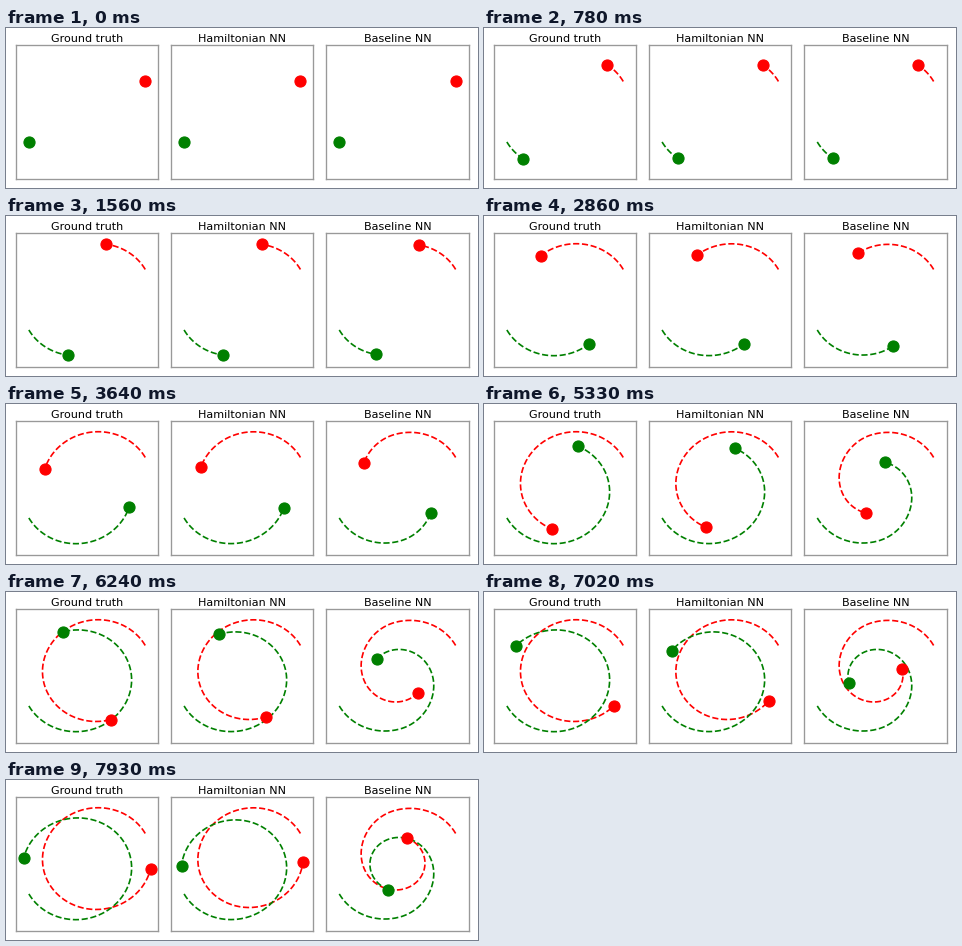
Animation of 472x160 px, one loop 8000 ms. Source, as a matplotlib script:

```python
import matplotlib.pyplot as plt
import numpy as np
from matplotlib.animation import FuncAnimation

W, H, DPI = 472, 160, 80
STEP, LOOP, TICK = 130, 8000, 20   # ms
LAST = LOOP // STEP                # index of the final pose
SUB = 4                            # trail samples per step

# Panel layout in pixels; data units are pixels on the vertical axis
LEFT, PITCH, WIDTH = 9.9, 155.2, 142.3
BOTTOM, HEIGHT = 9.3, 134
LIM = HEIGHT / 2

# True orbit: size, eccentricity, periapsis angle, starting phase, mean motion
SEMI, ECC = 51.77, 0.209
PERI, PHASE, RATE = np.radians([208.1, -178.8, 5.09])


def ease(u, start, end):
    """Smoothstep from 0 at start to 1 at end."""
    v = np.clip((u - start) / (end - start), 0, 1)
    return v * v * (3 - 2 * v)


def kepler(t):
    """Radius and unwrapped angle on the true orbit at step t."""
    mean = PHASE + RATE * t
    anomaly = mean
    for _ in range(20):
        anomaly = mean + ECC * np.sin(anomaly)
    r = SEMI * (1 - ECC * np.cos(anomaly))
    half = np.arctan2(np.sqrt(1 + ECC) * np.sin(anomaly / 2),
                      np.sqrt(1 - ECC) * np.cos(anomaly / 2))
    return r, 2 * half + PERI


# Model errors over the run u = 0..1: radius offset (px), angle offset (deg)
def exact(u):
    return 0, 0


def hamiltonian(u):
    return -2.8 * ease(u, 0.5, 0.85), u**2 * (16 * ease(u, 0.55, 0.95) - 9)


def baseline(u):
    return -33 * ease(u, 0.3, 1.05), u**2 * (138 * ease(u, 0.41, 1) - 62)


def orbit(error, t):
    r, angle = kepler(t)
    dr, da = error(t / LAST)
    r, angle = r + dr, angle + np.radians(da)
    return np.array([r * np.cos(angle), r * np.sin(angle)])


def add_panel(i, title):
    ax = fig.add_axes([(LEFT + i * PITCH) / W, BOTTOM / H, WIDTH / W, HEIGHT / H],
                      xlim=(-LIM, LIM), ylim=(-LIM, LIM), xticks=[], yticks=[])
    ax.set_title(title, fontsize=10, pad=2.8)
    for spine in ax.spines.values():
        spine.set(color="#999999", linewidth=1.2)
    return ax


plt.rcParams["font.family"] = "DejaVu Sans"
fig = plt.figure(figsize=(W / DPI, H / DPI), dpi=DPI, facecolor="white")
times = np.arange(LAST * SUB + 1) / SUB
models = {"Ground truth": exact, "Hamiltonian NN": hamiltonian,
          "Baseline NN": baseline}
bodies = []
for i, (title, error) in enumerate(models.items()):
    ax = add_panel(i, title)
    path = orbit(error, times)
    for sign, color in ((1, "red"), (-1, "green")):
        trail, = ax.plot([], [], "--", color=color, lw=1.5)
        ball, = ax.plot([], [], "o", color=color, ms=10, zorder=3)
        bodies.append((sign * path, trail, ball))


def draw(i):
    step = min((i * TICK + TICK // 2) // STEP, LAST)
    n = step * SUB
    for path, trail, ball in bodies:
        trail.set_data(*path[:, :n + 1])
        ball.set_data(*path[:, n:n + 1])
    return [artist for body in bodies for artist in body[1:]]


anim = FuncAnimation(fig, draw, frames=LOOP // TICK, interval=TICK,
                     repeat=True, repeat_delay=0, blit=False)
plt.show()
```
